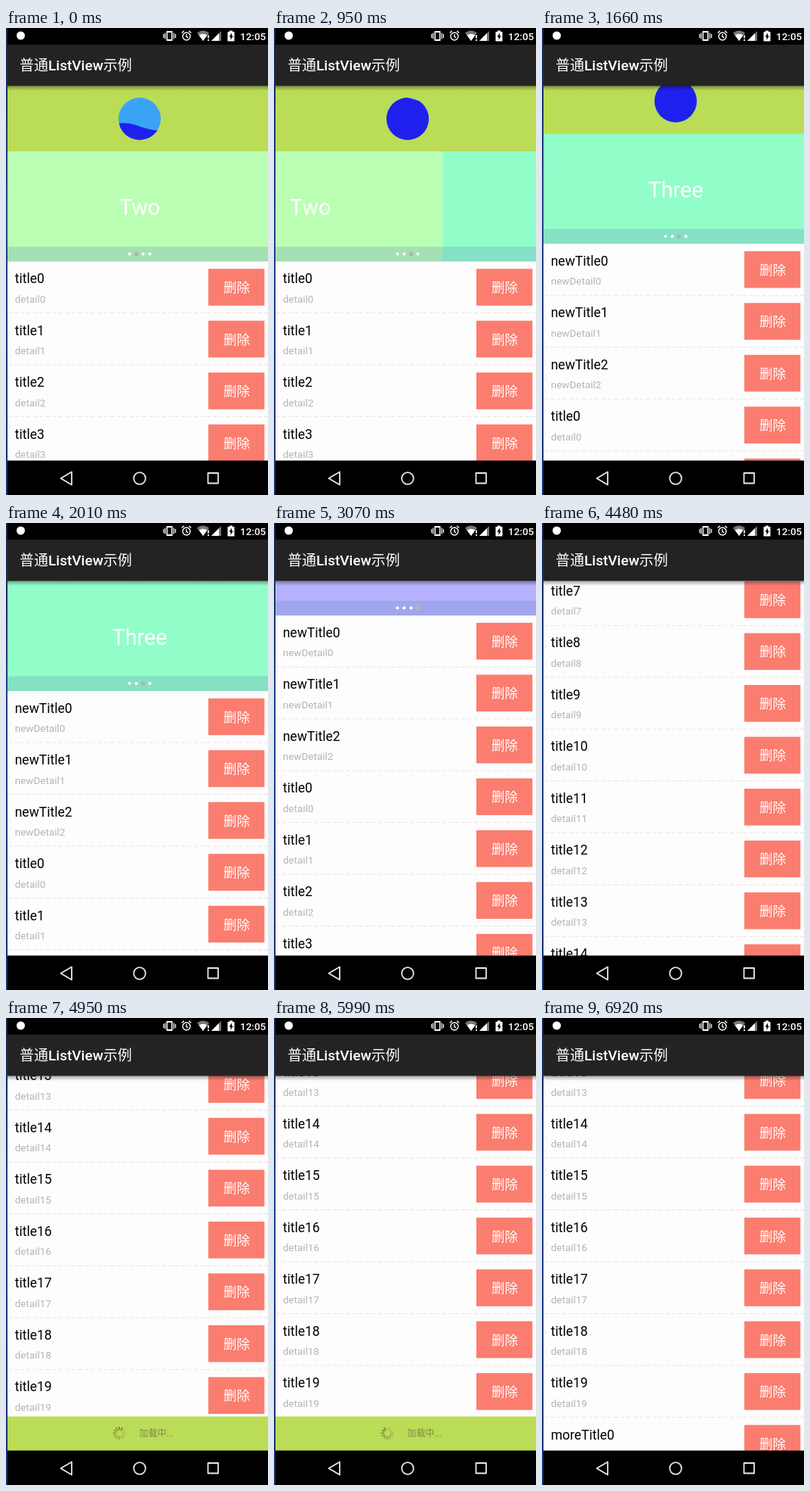
These frames come from a looping animation (347x617 px, 7460 ms). An HTML page:

```html
<!DOCTYPE html>
<html lang="zh">
<head>
<meta charset="utf-8">
<title>ListView</title>
<style>
  html, body { margin: 0; width: 100%; height: 100%; overflow: hidden; background: #000; }
  svg { display: block; width: 347px; height: 617px; }
  text { font-family: Roboto, "Noto Sans CJK SC", "Noto Sans CJK", sans-serif; }
  .mid { text-anchor: middle; }
  .title { font-size: 17.5px; }
  .detail { font-size: 13.5px; fill: #b4b4b4; }
  .delete { font-size: 17.5px; fill: #fff; }
  .page { font-size: 28.7px; fill: #fff; }
</style>
</head>
<body>
<svg viewBox="0 0 347 617">
  <defs>
    <linearGradient id="shade" x2="0" y2="1">
      <stop offset="0" stop-opacity=".36"/>
      <stop offset="1" stop-opacity="0"/>
    </linearGradient>
    <linearGradient id="edge" x2="0" y2="1">
      <stop offset="0" stop-color="#14244f"/>
      <stop offset=".4" stop-color="#23448c"/>
      <stop offset="1" stop-color="#1b2f6d"/>
    </linearGradient>
    <clipPath id="disc"><circle cx="177" cy="120" r="28"/></clipPath>
  </defs>

  <rect width="347" height="617" fill="#fdfdfd"/>
  <g id="rows"></g>

  <g id="head">
    <rect x="2" y="76" width="350" height="87.5" fill="#bbdc56"/>
    <g clip-path="url(#disc)">
      <rect x="149" y="92" width="56" height="56" fill="#3ba3f6"/>
      <path id="level" d="M145 -1 Q158 -5 177 2 T209 7 V90 H145 Z" fill="#2020ee"/>
    </g>
    <g id="pages"></g>
    <rect x="2" y="289" width="350" height="19.5" fill="#6482b4" fill-opacity=".25"/>
    <g id="dots"></g>
  </g>

  <g id="footer">
    <rect x="2" y="526.5" width="350" height="46" fill="#bbdc56"/>
    <g id="spinner"></g>
    <text x="176.5" y="553" font-size="12" fill="#7d8a4e">加载中...</text>
  </g>

  <rect y="76" width="347" height="7" fill="url(#shade)"/>
  <rect y="22" width="347" height="54.5" fill="#232323"/>
  <text x="18" y="56" font-size="19" fill="#fff">普通<tspan font-weight="500">ListView</tspan>示例</text>

  <rect width="347" height="22" fill="#000"/>
  <g fill="#fff">
    <circle cx="19.5" cy="10" r="5.5"/>
    <path d="M212.5 4h8v13h-8zM214 6v9h5V6z" fill-rule="evenodd"/>
    <path d="M208.7 8v5M210.7 6.5v8M222.3 6.5v8M224.5 8v5" stroke="#fff" stroke-width="1.2"/>
    <g fill="none" stroke="#fff" stroke-width="1.4">
      <circle cx="239" cy="11" r="5"/>
      <path d="M239 8v3.5l2.2 1.3M232.8 6.5l3-2.6M245.2 6.5l-3-2.6"/>
    </g>
    <path d="M253 6.5q8-6 16 0l-8 10.5z" fill="#777"/>
    <path d="M255.5 9.5q5.5-3.5 11 0L261 17z"/>
    <path d="M267 9.5h2v4h-2zM267 15h2v2h-2z"/>
    <path d="M285 4v13h-13z" fill="#777"/>
    <path d="M282 7v10h-10z"/>
    <path d="M293.5 5h2.5V3.5h4V5h2.5v12.5h-9z"/>
    <path d="M299 6.5l-3.5 5.3h2V16l3.3-5.6h-1.8z" fill="#000"/>
    <text x="310" y="15.5" font-size="13.5" font-weight="500">12:05</text>
  </g>

  <rect y="571.5" width="347" height="45.5" fill="#000"/>
  <g fill="none" stroke="#e8e8e8" stroke-width="1.8" stroke-linejoin="round">
    <path d="M87 586.5v17L72.5 595z"/>
    <circle cx="177" cy="595" r="7.8"/>
    <rect x="267.5" y="588" width="13.5" height="13.5"/>
  </g>
  <rect width="2" height="617" fill="url(#edge)"/>
</svg>

<script>
const LOOP = 7460, ROW = 68.5, PAGE = 350, LIST_TOP = 308.5;
const $ = id => document.getElementById(id);
const range = n => [...Array(n).keys()];
const named = (prefix, n) => range(n).map(i => prefix + i);

const oldItems = named('title', 20);
const items = [...named('newTitle', 3), ...oldItems, ...named('moreTitle', 5)];
const detailOf = title => title.replace('title', 'detail').replace('Title', 'Detail');

const progress = (t, start, end) => Math.min(1, Math.max(0, (t - start) / (end - start)));
const smooth = u => u * u * (3 - 2 * u);
const easeOut = (u, power) => 1 - (1 - u) ** power;
const move = (node, x, y) => node.setAttribute('transform', `translate(${x} ${y})`);

$('rows').innerHTML = range(9).map(() => `<g>
  <text class="title" x="11.7" y="28.5"></text>
  <text class="detail" x="11.7" y="54"></text>
  <rect x="268" y="9.7" width="74.3" height="48.6" fill="#fb7d6f"/>
  <text class="delete mid" x="305.5" y="40.5">删除</text>
  <path d="M2 68H347" stroke="#e4e4e4" stroke-dasharray="5 3.5"/>
</g>`).join('');

$('pages').innerHTML = [['Two', '#bbffb5'], ['Three', '#91fec9'], ['Four', '#b5b1ff']]
  .map(([label, color], i) => `<g transform="translate(${2 + i * PAGE})">
    <rect y="163" width="${PAGE}" height="145.5" fill="${color}"/>
    <text class="page mid" x="175" y="247">${label}</text></g>`).join('');

$('dots').innerHTML = range(4)
  .map(i => `<circle cx="${163.5 + 9 * i}" cy="298.5"/>`).join('');

$('spinner').innerHTML = range(12)
  .map(i => `<path d="M150 544.5v-4.5" stroke="#6d7a45" stroke-width="1.8"
    transform="rotate(${30 * i} 150 548.5)"/>`).join('');

const rows = [...$('rows').children];
const dots = [...$('dots').children];
const spokes = [...$('spinner').children];

function drawRows(top, list) {
  const first = Math.max(0, Math.floor((76 - top) / ROW));
  rows.forEach((row, i) => {
    const title = list[first + i];
    row.style.display = title ? '' : 'none';
    if (!title) return;
    move(row, 0, top + (first + i) * ROW);
    row.children[0].textContent = title;
    row.children[1].textContent = detailOf(title);
  });
}

function draw(t) {
  const collapse = 86.5 * smooth(progress(t, 1480, 2010));
  const scroll = 241.5 * smooth(progress(t, 2760, 3300) ** 1.48)
    + 983 * smooth(progress(t, 4080, 4780))
    + 45 * easeOut(progress(t, 4830, 5130), 4.15);
  const shift = -collapse - scroll;
  move($('head'), 0, shift);
  drawRows(LIST_TOP + shift, t < 1480 ? oldItems : items);

  move($('level'), 0, 128 - 0.04 * Math.min(t, 1300));

  const swipe = start => easeOut(progress(t, start, start + 570), 5);
  move($('pages'), -PAGE * (swipe(901) + swipe(2650)), 0);
  const current = 1 + (t >= 890) + (t >= 2650);
  dots.forEach((dot, i) => {
    dot.setAttribute('r', i === current ? 2.9 : 2);
    dot.setAttribute('fill', i === current ? '#b0b4b4' : '#fff');
  });

  $('footer').style.display = t >= 4830 && t < 6920 ? '' : 'none';
  move($('footer'), 0, 46 * smooth(progress(t, 6320, 6920)));
  const step = Math.floor(t / 100);
  spokes.forEach((spoke, i) => {
    const age = (step - i + 120) % 12;
    spoke.setAttribute('opacity', 0.9 - 0.065 * age);
  });
}

const start = performance.now();
function tick() {
  draw((performance.now() - start) % LOOP);
  requestAnimationFrame(tick);
}
tick();
</script>
</body>
</html>
```
